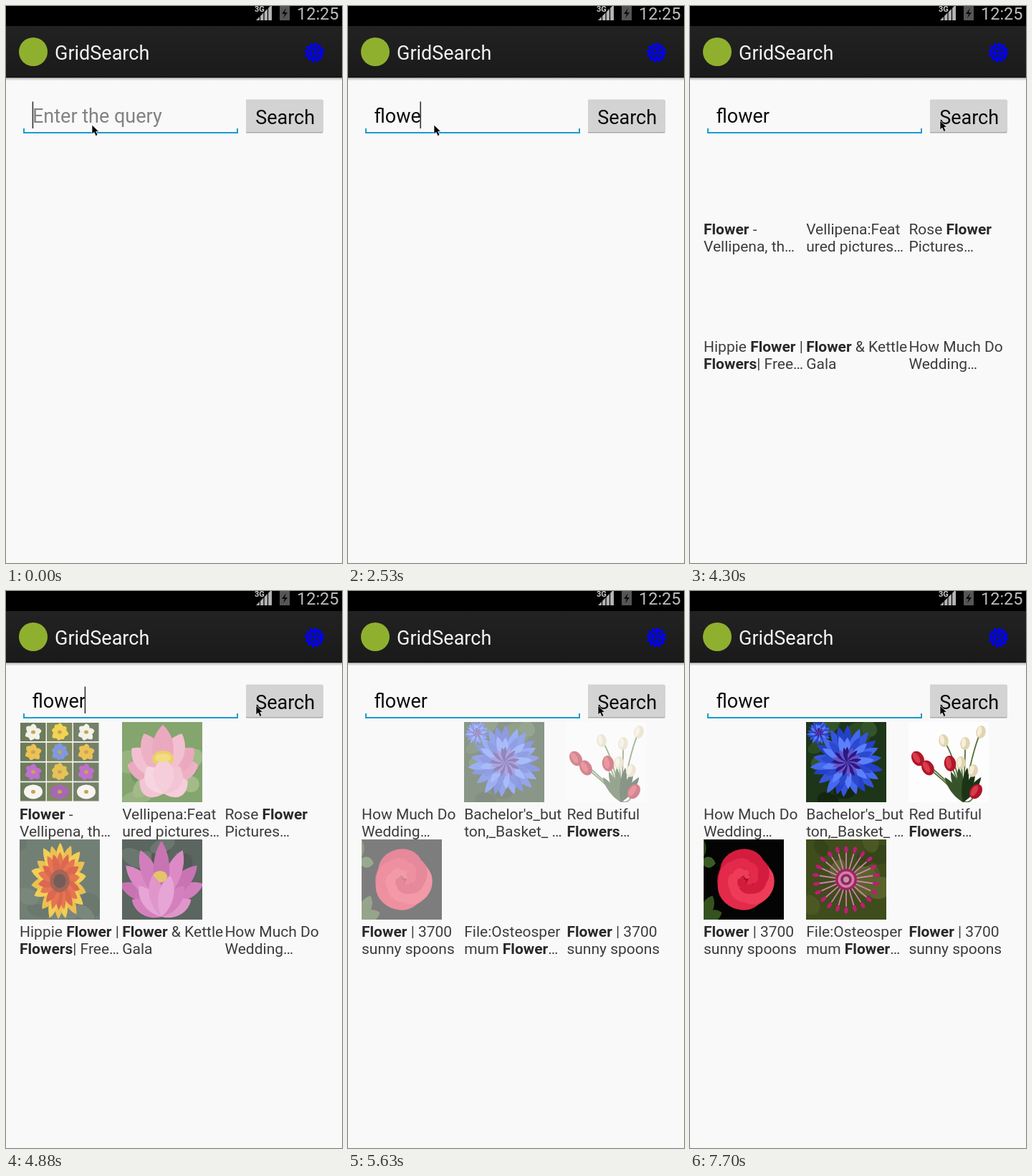
Write an HTML page that moves like this. It is 469 by 778 pixels and loops after 8000 ms.

```html
<!DOCTYPE html>
<html lang="en">
<head>
<meta charset="utf-8">
<title>Image search</title>
<style>
  html, body { margin: 0; width: 100%; height: 100%; overflow: hidden; background: #f9f9f9; }
  svg { display: block; font-family: Roboto, "Liberation Sans", sans-serif; }
  .big { font-size: 27px; }
  .cap { font-size: 21px; fill: #3c3c3c; white-space: pre; }
  .cap tspan { font-weight: 700; fill: #282828; }
</style>
</head>
<body>
<svg id="stage" width="469" height="778" viewBox="0 0 469 778">
  <defs>
    <linearGradient id="bar" x2="0" y2="1"><stop stop-color="#222"/><stop offset="1" stop-color="#1a1a1a"/></linearGradient>
    <linearGradient id="shade" x2="0" y2="1"><stop stop-color="#bbb"/><stop offset="1" stop-color="#f9f9f9"/></linearGradient>
  </defs>
  <rect width="469" height="778" fill="#f9f9f9"/>
  <rect width="469" height="28" fill="#000"/>
  <rect y="28" width="469" height="72" fill="url(#bar)"/>
  <rect y="99" width="469" height="1.5" fill="#0c0c0c"/>
  <rect y="100.5" width="469" height="4" fill="url(#shade)"/>

  <path d="M349 20L371 -2V20Z" fill="#b4b4b4"/>
  <path d="M354.5 12V20M360 7V20M365.5 2V20" stroke="#000" stroke-width="1.2"/>
  <rect x="346" y="-2" width="15" height="11" fill="#000"/>
  <text x="347" y="8" font-size="11" font-weight="700" fill="#ccc">3G</text>
  <path d="M382 0H396V20H382Z" fill="#555"/>
  <path d="M391 3L385 11H389L387 17L393 9H389Z" fill="#0a0a0a"/>
  <text x="406" y="19" font-size="23.5" fill="#bcbcbc">12:25</text>

  <circle cx="38" cy="64" r="20" fill="#8fb02f"/>
  <text class="big" x="68" y="74.5" fill="#f3f3f3">GridSearch</text>
  <g transform="translate(430.5 65)" fill="none" stroke="#00f">
    <circle r="12.2" stroke-width="3" stroke-dasharray="3.2 3.188"/>
    <circle r="9.8" stroke-width="2.8"/>
    <circle r="5.7" stroke-width="2.4"/>
    <circle r="2.2" fill="#00f" stroke="none"/>
    <path d="M-9 0H9M0 -9V9" stroke-width="1.4"/>
  </g>

  <path d="M25 171V177H323V171" fill="none" stroke="#1c9bd0" stroke-width="2"/>
  <text id="query" class="big" y="163"></text>
  <rect id="caret" y="133.5" width="1.6" height="37.5" fill="#333"/>
  <rect x="335" y="131" width="107.5" height="46.5" rx="1.5" fill="#a9a9a9"/>
  <rect id="button" x="335" y="130.5" width="107" height="45.5" rx="1.5"/>
  <text class="big" x="348.2" y="165" fill="#0a0a0a">Search</text>

  <g id="first"></g>
  <g id="second"></g>
  <path id="mouse" d="M0 0V13L3 10.2L5.3 15.5L8 14.3L5.7 9.3H9.6Z" fill="#000" stroke="#fff" stroke-width=".7"/>
</svg>
<script>
const $ = id => document.getElementById(id);
const repeat = (n, make) => Array.from({ length: n }, (_, i) => make(i)).join('');
const clamp = v => Math.min(1, Math.max(0, v));
const pick = (list, i) => list[i % list.length];
const random = seed => () => (seed = seed * 16807 % 2147483647) / 2147483647;

// Drawing helpers; petals point up before turning
const box = (x, y, w, h, fill) => `<rect x="${x}" y="${y}" width="${w}" height="${h}" fill="${fill}"/>`;
const oval = (x, y, rx, ry, fill, turn = 0) =>
  `<ellipse rx="${rx}" ry="${ry}" fill="${fill}" transform="translate(${x} ${y}) rotate(${turn})"/>`;
const stroke = (d, color, width) =>
  `<path d="${d}" fill="none" stroke="${color}" stroke-width="${width}" stroke-linecap="round"/>`;
const petal = (x, y, turn, len, w, fill) =>
  `<path transform="translate(${x} ${y}) rotate(${turn})" fill="${fill}" d="M0 0C${w} ${-len * .3} ${w} ${-len * .75} 0 ${-len}C${-w} ${-len * .75} ${-w} ${-len * .3} 0 0"/>`;
const ring = (x, y, n, len, w, fills) => {
  const rnd = random(n * 991);
  return repeat(n, i => petal(x, y, (i + rnd() * .4) * 360 / n, len * (.88 + .12 * rnd()), w, pick(fills, i)));
};
// Petals in pairs from the sides towards the middle
const fan = (x, y, n, spread, len, w, fills) => repeat(n, i => {
  const turn = spread * (1 - Math.floor(i / 2) * 2 / (n - 1)) * (i % 2 ? 1 : -1);
  return petal(x, y, turn, len * (1 - Math.abs(turn) / 260), w, pick(fills, i));
});
const backdrop = (base, tones, seed) => {
  const rnd = random(seed * 7919);
  return box(0, 0, 112, 112, base) + repeat(9, i =>
    oval(rnd() * 112, rnd() * 112, 8 + rnd() * 14, 8 + rnd() * 10, pick(tones, i), rnd() * 180));
};

function mosaic() {
  const rows = [['#f2f0e4', '#f0c81c'], ['#e8b020', '#5878d8'], ['#ac44bc', '#e0b020'], ['#f6f4f0', '#8a3a9a']];
  return box(0, 0, 112, 112, '#f4f4f0') + repeat(12, i => {
    const col = i % 3, row = Math.floor(i / 3);
    const x = 1 + col * 37, y = 1 + row * 27.8, cx = x + 18, cy = y + 13;
    const tone = rows[row][col % 2];
    const bloom = row === 3 ? oval(cx, cy, 13, 10, tone) : ring(cx, cy, 6 + col % 2 * 2, 13, 6, [tone]);
    return box(x, y, 35.5, 26, pick(['#3d5128', '#56642c', '#4a583a'], i)) + bloom + oval(cx, cy, 3, 2.6, '#b88a20');
  });
}

const paleLotus = () => backdrop('#5f8a42', ['#789c58', '#467a35', '#86a764'], 3) +
  fan(57, 76, 7, 72, 72, 20, ['#e78fac', '#e999b6', '#f1aec4']) + oval(57, 51, 15, 11, '#e8c23c') +
  fan(58, 100, 5, 62, 50, 19, ['#f2b4c8', '#f5bfd0', '#f7cad8']) + oval(57, 50, 11, 6, '#f0d45c');

const darkLotus = () => backdrop('#26352c', ['#3c4c40', '#1b271f'], 5) +
  fan(55, 88, 7, 66, 86, 15, ['#b8489c', '#c655a8', '#d166b4']) + oval(53, 52, 10, 8, '#dcb438') +
  fan(55, 108, 6, 60, 62, 14, ['#c858ac', '#d874bc', '#e08ac8']);

const daisy = () => backdrop('#455749', ['#506153', '#3b4d40'], 7) +
  `<g transform="translate(56 58) scale(.72 1)">${ring(0, 0, 18, 58, 12, ['#f0c020', '#e8ae18'])}${
    ring(0, 0, 18, 44, 9, ['#df4a1c', '#d23818'])}${oval(0, 0, 19, 16, '#8a3420')}${oval(0, 0, 12, 10, '#4a2a24')}</g>`;

const blueBloom = (x, y, r) => ring(x, y, 22, r, r * .16, ['#2440c8', '#4468f0', '#3454dc']) +
  ring(x, y, 17, r * .74, r * .13, ['#5c80fa', '#2c48cc']) +
  ring(x, y, 19, r * .42, r * .07, ['#2a1a80', '#6a50c8']);
const cornflower = () => backdrop('#1d3518', ['#2c4a22', '#33542a', '#14260f'], 11) +
  blueBloom(18, 15, 18) + blueBloom(57, 56, 53);

// Four red cups, then the cream ones; each leans away from the stem base
function tulips() {
  const cups = [[13, 51], [27, 64], [58, 58], [94, 97], [49, 26], [79, 30], [73, 57], [90, 68], [101, 14]];
  return box(0, 0, 112, 112, '#fdfdfd') +
    cups.map(([x, y]) => stroke(`M${x} ${y}Q${(x + 74) / 2 + 3} ${y + 20} 76 110`, '#55703a', 1.8)).join('') +
    fan(76, 112, 6, 36, 50, 6, ['#37532a', '#1c3416']) +
    cups.map(([x, y], i) => {
      const red = i < 4, h = red ? 11 : 9;
      const turn = Math.atan2(x - 70, 130 - y) * 50;
      return oval(x, y, h * .75, h, red ? '#b0162a' : '#e0d4b0', turn) +
        oval(x - 2, y - 1, h * .35, h * .75, red ? '#d83c48' : '#f6eed8', turn);
    }).join('');
}

// Overlapping petals wound inwards by the golden angle
const rose = () => box(0, 0, 112, 112, '#040404') +
  fan(-4, 30, 3, 100, 34, 10, ['#2e4a1c', '#3b5c24']) + fan(-2, 112, 4, 70, 40, 11, ['#27401a', '#35521f']) +
  oval(58, 58, 39, 38, '#c4163a') +
  repeat(18, i => {
    const r = 46 * (1 - i / 19), a = i * 2.4 + 2;
    const x = 59 + Math.cos(a) * r * .32, y = 55 + Math.sin(a) * r * .3;
    const turn = a * 180 / Math.PI;
    return oval(x, y, r * .62, r * .72, '#9c0c2a', turn) +
      oval(x + Math.cos(a) * 2, y + Math.sin(a) * 2, r * .62, r * .72, pick(['#e42a4a', '#d41c3e', '#ee3c58'], i), turn);
  });

const spoons = () => backdrop('#3f4c1c', ['#4c5824', '#36441a', '#59622c'], 13) +
  repeat(22, i => `<g transform="translate(56 56) rotate(${i * 360 / 22})">${
    stroke('M0 -14V-37', '#cc84a6', 1.8)}${oval(0, -42 - i % 2, 2.6, 4.5, '#c01c74')}</g>`) +
  ['#a82068', '#d080a6', '#8c2860', '#c890a8'].map((tone, i) => oval(56, 56, 15 - i * 3.6, 15 - i * 3.6, tone)).join('');

// Grid of three columns: picture, its fade-in start, two caption lines with *bold*
const bold = s => s.replace(/&/g, '&amp;').replace(/\*(.+?)\*/g, '<tspan>$1</tspan>');
const grid = cells => cells.map(([art, fade, ...lines], i) => {
  const x = 19 + i % 3 * 143.2, y = 183 + Math.floor(i / 3) * 164;
  const photo = art ? `<svg class="photo" data-fade="${fade}" x="${Math.round(x)}" y="${y}" width="112" height="112">${art()}</svg>` : '';
  return photo + lines.map((s, n) => `<text class="cap" x="${x}" y="${y + 135.5 + n * 24}">${bold(s)}</text>`).join('');
}).join('');

$('first').innerHTML = grid([
  [mosaic, 30.6, '*Flower* -', 'Vellipena, th…'],
  [paleLotus, 30.6, 'Vellipena:Feat', 'ured pictures…'],
  [null, 0, 'Rose *Flower*', 'Pictures…'],
  [daisy, 30.6, 'Hippie *Flower* |', '*Flowers*| Free…'],
  [darkLotus, 30.6, '*Flower* & Kettle', 'Gala'],
  [null, 0, 'How Much Do', 'Wedding…']
]);
$('second').innerHTML = grid([
  [null, 0, 'How Much Do', 'Wedding…'],
  [cornflower, 36.4, "Bachelor's_but", 'ton,_Basket_ …'],
  [tulips, 36.4, 'Red Butiful', '*Flowers*…'],
  [rose, 36.4, '*Flower* | 3700', 'sunny spoons'],
  [spoons, 38.3, 'File:Osteosper', 'mum *Flower*…'],
  [null, 0, '*Flower* | 3700', 'sunny spoons']
]);

// All moments below are counted in ticks of 148 ms
const TICK = 148, BLINK = 3.5, FADE = 3.2;
const keys = [4.5, 9.8, 11.5, 14.6, 16.5, 18];
const blinkStarts = [-2.5, ...keys, 34.5];
const photos = [...document.querySelectorAll('.photo')];
const ease = v => v * v * (3 - 2 * v);

function draw(ms) {
  const n = Math.floor((ms % 8000 + 5) / TICK);
  const typed = keys.filter(k => k <= n).length;
  const query = $('query');
  query.textContent = typed ? 'flower'.slice(0, typed) : 'Enter the query';
  query.setAttribute('x', typed ? 36.5 : 37);
  query.setAttribute('fill', typed ? '#0c0c0c' : '#828282');

  const age = n - blinkStarts.filter(s => s <= n).pop();
  $('caret').setAttribute('x', 36.6 + (typed && query.getComputedTextLength() - 1.5));
  $('caret').setAttribute('opacity', Math.floor(age / BLINK) % 2 ? 0 : 1);

  const move = ease(clamp((n - 19) / 5));
  $('mouse').setAttribute('transform', `translate(${120 + 229 * move} ${166 - 6 * move})`);
  $('button').setAttribute('fill', n >= 25 && n < 27 ? '#bdbbbd' : '#d3d3d3');

  $('first').style.display = n >= 29 && n < 34 ? '' : 'none';
  $('second').style.display = n >= 34 ? '' : 'none';
  for (const photo of photos) photo.style.opacity = clamp((n - photo.dataset.fade) / FADE);
}

const start = performance.now();
function loop() {
  draw(performance.now() - start);
  requestAnimationFrame(loop);
}
loop();
</script>
</body>
</html>
```
